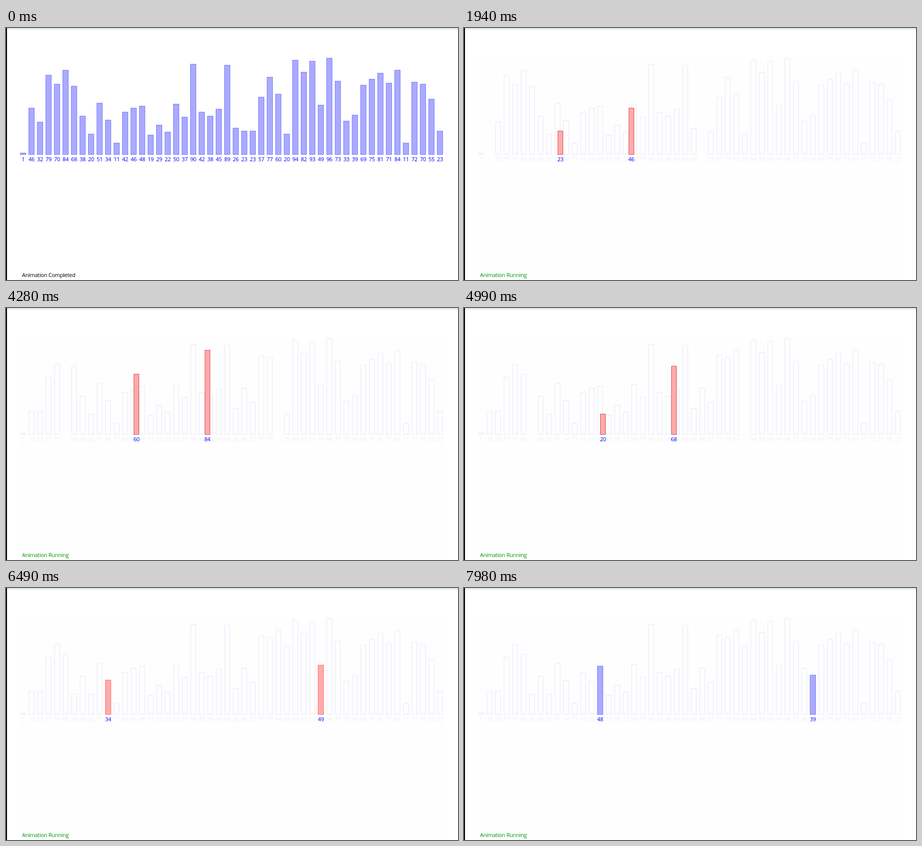
These frames come from a looping animation (903x505 px, 8 s). An HTML page:

```html
<!DOCTYPE html>
<html lang="en">
<head>
<meta charset="utf-8">
<title>Shell sort</title>
<style>
  html, body { margin: 0; width: 100%; height: 100%; overflow: hidden; background: #fff; }
  svg { display: block; width: 903px; height: 505px; }
  text { font: 11px "Open Sans", "Noto Sans", sans-serif; letter-spacing: -.3px; }
  #bars text { text-anchor: middle; fill: #00f; }
  .blue rect { fill: #aaf; stroke: #7f7fff; }
  .red rect { fill: #faa; stroke: #ff7878; }
  .move rect { fill: #faa; stroke: #dc525c; }
  .pale rect { fill: none; stroke: #f2f2ff; }
  #bars .pale text { fill: #efeffb; }
  #veil { fill: #fefefe; }
  #status { fill: #000; }
  .running #status { fill: #009900; }
  svg:not(.running) #veil { display: none; }
</style>
</head>
<body>
<svg viewBox="0 0 903 505">
  <rect width="903" height="3" fill="#ddeedd"/>
  <rect width="2" height="505"/>
  <rect id="veil" x="28" y="60" width="845" height="441"/>
  <g id="bars"></g>
  <text id="status" x="32" y="499"></text>
</svg>
<script>
const LOOP = 8000, GAP = 25, PITCH = 17, LEFT = 28, BASE = 254;
const START = 1090, TICK = 137.3;   // the picture refreshes once per tick
const values = [
  1, 46, 32, 79, 70, 84, 68, 38, 20, 51, 34, 11, 42, 46, 48, 19, 29, 22, 50, 37, 90, 42, 38, 45, 89,
  26, 23, 23, 57, 77, 60, 20, 94, 82, 93, 49, 96, 73, 33, 39, 69, 75, 81, 71, 84, 11, 72, 70, 55, 23
];

const stage = document.querySelector('svg');
const bars = document.getElementById('bars');
const status = document.getElementById('status');

// Phases of the sort passed at a tick; the pace rises slightly near the end
const phaseAt = n => Math.max((n + 0.999) / 1.542, (n - 2.22) / 1.4);

// Walks the gapped pass: each pair turns blue, then red, then swaps if out of order
function sortAt(phase) {
  const list = values.slice();
  for (let pair = 0; ; pair++) {
    const other = pair + GAP;
    const swap = list[pair] > list[other];
    const length = swap ? 3 : 2;
    if (phase < length || pair === GAP - 1) {
      const kind = phase < 1 ? 'blue' : phase < 2 ? 'red' : 'move';
      const shift = phase < 2 ? 0 : phase < 2.5 ? 1 / 3 : 2 / 3;
      return { list, pair, kind, shift };
    }
    if (swap) [list[pair], list[other]] = [list[other], list[pair]];
    phase -= length;
  }
}

function bar(value, x, kind) {
  const line = kind === 'pale' ? 2 : 1;
  const width = kind === 'move' ? 11 : 12;
  const height = 2 * value + 2;
  return `<g class="${kind}"><rect x="${Math.ceil(x) + line / 2}" y="${BASE - height + line / 2}"
    width="${width - line}" height="${height - line}" stroke-width="${line}"/>
    <text x="${x + 6}" y="267">${value}</text></g>`;
}

function draw(n) {
  const running = n >= 0;
  const { list, pair, kind, shift } = sortAt(running ? phaseAt(n) : 0);
  let back = '', front = '';
  list.forEach((value, i) => {
    const x = LEFT + PITCH * i;
    const travel = (i < GAP ? 1 : -1) * shift * GAP * PITCH;
    if (running && i % GAP === pair) front += bar(value, x + travel, kind);
    else back += bar(value, x, running ? 'pale' : 'blue');
  });
  bars.innerHTML = back + front;
  stage.classList.toggle('running', running);
  status.textContent = running ? 'Animation Running' : 'Animation Completed';
}

let shown;
const began = performance.now();
function update() {
  const t = (performance.now() - began) % LOOP;
  const n = Math.max(-1, Math.floor((t - START) / TICK));
  if (n !== shown) draw(shown = n);
  requestAnimationFrame(update);
}
update();
</script>
</body>
</html>
```
